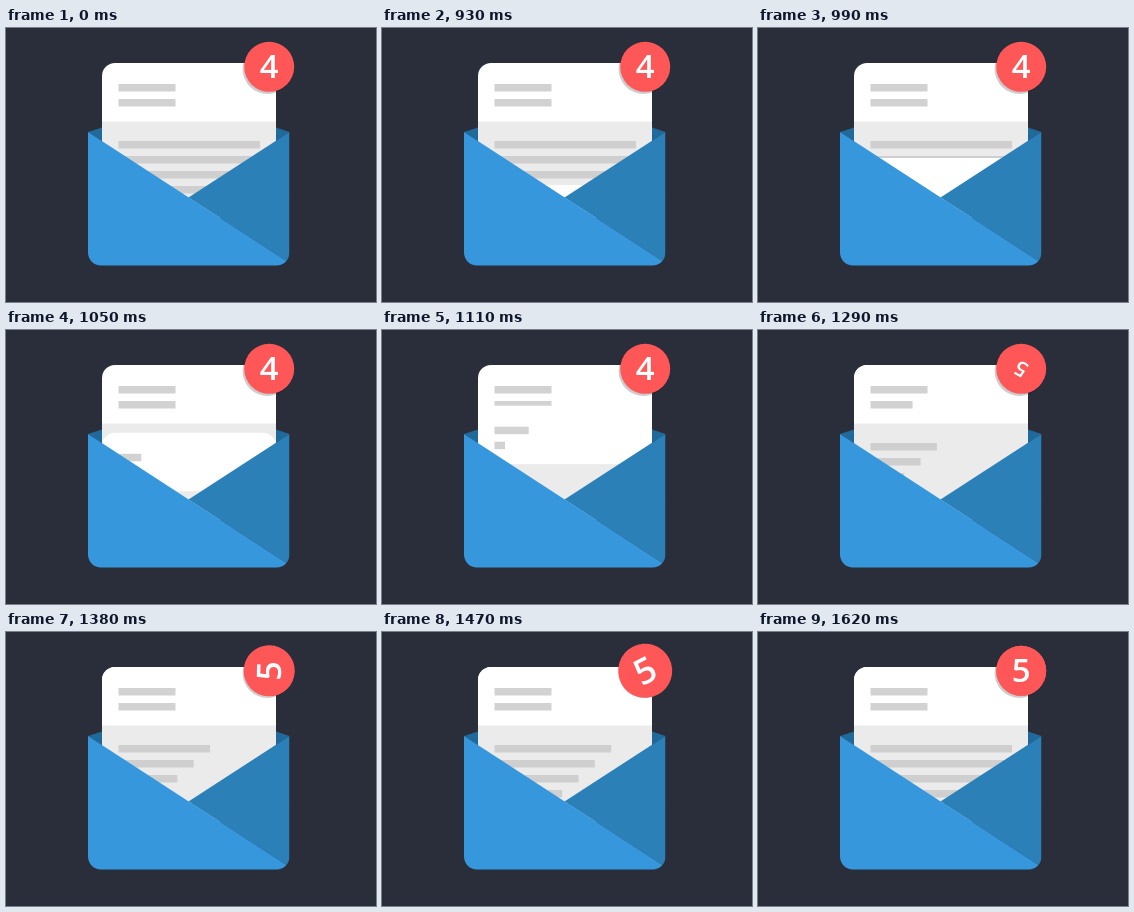
Write an HTML page with a canvas that moves like this. It is 370 px wide and 274 px high and loops after 2.7 s.

```html
<!DOCTYPE html>
<html lang="en">
<head>
<meta charset="utf-8">
<title>Mail badge</title>
<style>
html, body { margin: 0; width: 100%; height: 100%; overflow: hidden; background: #2a2e3a; }
canvas { display: block; }
</style>
</head>
<body>
<canvas id="stage" width="370" height="274"></canvas>
<script>
const ctx = document.getElementById('stage').getContext('2d');
const LOOP = 2700, STEP = 30;
const clamp = (v, lo, hi) => Math.min(hi, Math.max(lo, v));
const mix = (t, t0, t1, a, b) => a + (b - a) * clamp((t - t0) / (t1 - t0), 0, 1);

function rect(x, y, w, h, color) {
  ctx.fillStyle = color;
  ctx.fillRect(x, y, w, h);
}

function poly(color, ...pts) {
  ctx.fillStyle = color;
  ctx.beginPath();
  for (const [x, y] of pts) ctx.lineTo(x, y);
  ctx.fill();
}

function disc(x, y, r, color) {
  ctx.fillStyle = color;
  ctx.beginPath();
  ctx.arc(x, y, r, 0, Math.PI * 2);
  ctx.fill();
}

// Letter shifted down by dy, its lines written up to time t
function letter(dy, t) {
  ctx.save();
  ctx.beginPath();
  ctx.rect(96, 0, 174, 190);
  ctx.clip();
  ctx.translate(0, dy);
  ctx.beginPath();
  ctx.roundRect(96, 35, 174, 220, [13, 13, 0, 0]);
  ctx.fillStyle = '#fff';
  ctx.fill();
  rect(96, 93.5, 174, 170, '#ebebeb');
  rect(112.5, 56, mix(t, 930, 1230, 0, 57), 7.5, '#d2d2d2');
  rect(112.5, 71, mix(t, 1050, 1375, 0, 57), 7.5, '#d2d2d2');
  for (let i = 0; i < 4; i++) {
    const start = 1052 + i * 58.5;
    rect(112.5, 113 + i * 15, mix(t, start, start + 507, 0, 141.5), 7.5, '#cfcfcf');
  }
  ctx.restore();
}

function envelope() {
  ctx.save();
  ctx.beginPath();
  ctx.roundRect(82, 90, 201.5, 147.5, [0, 0, 13, 13]);
  ctx.clip();
  poly('#2a80b7', [283.5, 104], [182.5, 169.5], [283.5, 235]);
  poly('#3697dc', [82, 104], [283.5, 235], [283.5, 240], [82, 240]);
  ctx.restore();
}

function badge(digit, scale, turn) {
  ctx.save();
  ctx.translate(263.2, 38.8);
  ctx.scale(scale, scale);
  ctx.rotate(turn * Math.PI / 180);
  disc(0, 0, 25, '#ff5758');
  ctx.fillStyle = '#fff';
  ctx.font = '600 33px "Open Sans", "Noto Sans", sans-serif';
  ctx.textAlign = 'center';
  ctx.fillText(digit, 0, 11.5);
  ctx.restore();
}

function draw(t) {
  rect(0, 0, 370, 274, '#2a2e3a');
  poly('#20699b', [82, 104], [96, 99.5], [270, 99.5], [283.5, 104], [182.5, 170]);
  letter(0, LOOP);
  if (t >= 930) letter(mix(t, 930, 1200, 122, 0), t);
  envelope();

  disc(261.6, 41, 25, 'rgba(0,0,0,.2)');
  badge('4', 1, 0);
  if (t > 1140) {
    const scale = t < 1410 ? mix(t, 1140, 1410, 0, 1.15) : mix(t, 1410, 1540, 1.15, 1);
    const turn = t < 1290 ? mix(t, 1140, 1290, -270, -150) : mix(t, 1290, 1510, -150, 0);
    badge('5', scale, turn);
  }
}

function tick(now) {
  draw(Math.floor(now % LOOP / STEP) * STEP);
  requestAnimationFrame(tick);
}
tick(performance.now());
</script>
</body>
</html>
```
